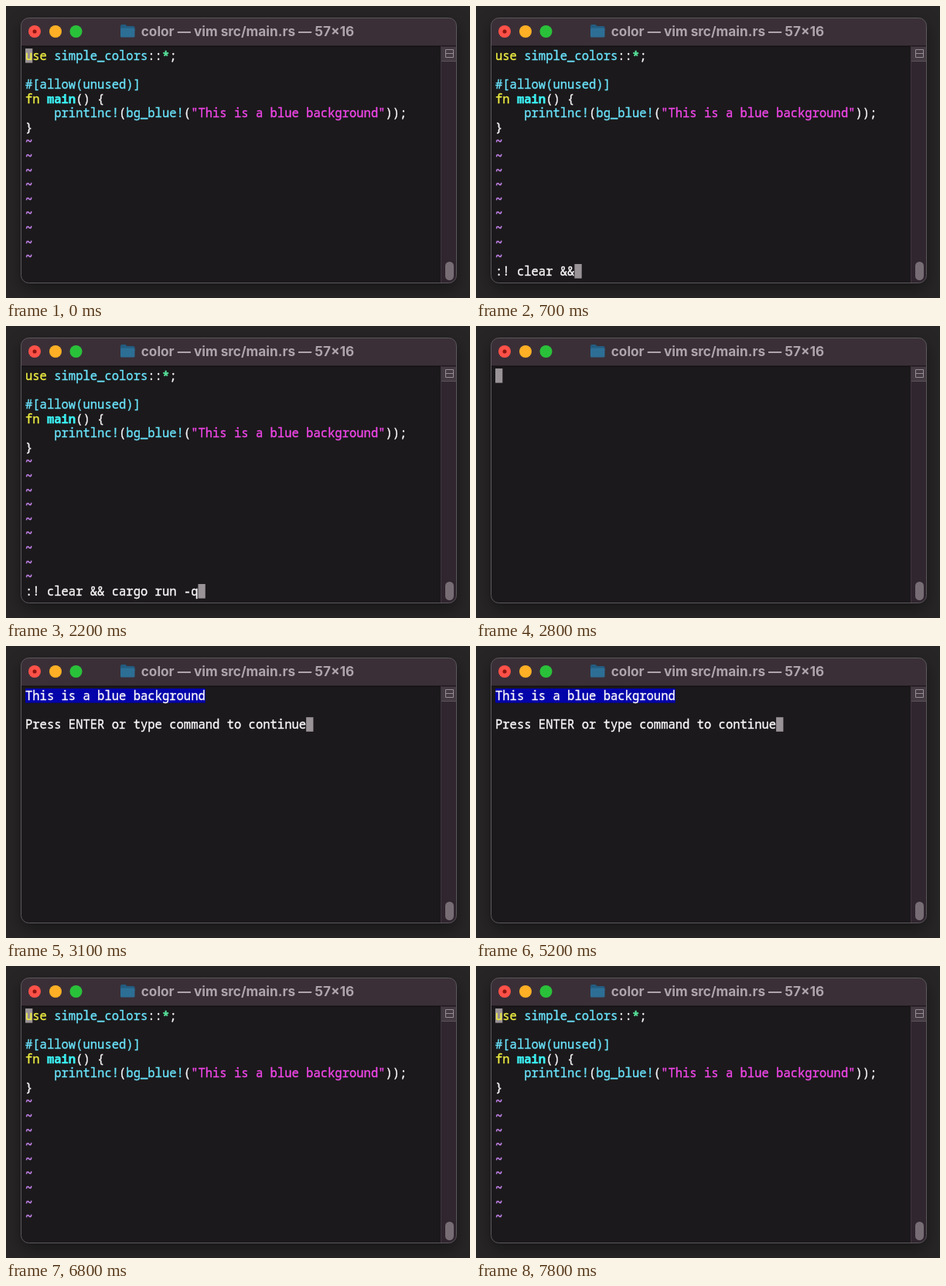
Recreate the animation shown at these times as an HTML page. Size 600x378 px, loop 8 s.

```html
<!DOCTYPE html>
<html lang="en">
<head>
<meta charset="utf-8">
<style>
  html, body { margin: 0; width: 100%; height: 100%; overflow: hidden; background: #252324; }
  svg { display: block; width: 600px; height: 378px; }
  .term text { font: 500 15.5px "Noto Sans Mono", "DejaVu Sans Mono", monospace; white-space: pre; stroke-width: .35px; }
  .term .bold { font-weight: 700; }
  .title { font: 700 17.2px Inter, Roboto, sans-serif; fill: #aea4ab; text-anchor: middle; }
</style>
</head>
<body>
<svg viewBox="0 0 600 378">
  <defs>
    <clipPath id="frame"><rect x="19.5" y="15.5" width="563" height="343" rx="10"/></clipPath>
    <filter id="shadow" x="-10%" y="-10%" width="120%" height="125%" color-interpolation-filters="sRGB">
      <feDropShadow dx="0" dy="7" stdDeviation="10" flood-color="#000" flood-opacity=".4"/>
    </filter>
  </defs>
  <rect width="600" height="378" fill="#272526"/>
  <rect x="19.5" y="15.5" width="563" height="343" rx="10" fill="#1b191b" filter="url(#shadow)"/>
  <g clip-path="url(#frame)">
    <rect x="19" y="15" width="564" height="37" fill="#3a2f37"/>
    <rect x="19" y="51.5" width="564" height="1" fill="#0c0a0c"/>
    <rect x="562" y="52" width="21" height="307" fill="#30262f"/>
    <rect x="562" y="52" width="1" height="307" fill="#40363f"/>
    <rect x="563" y="53" width="19" height="18" fill="#433a42"/>
    <path d="M563 71.5h19" stroke="#5c525a"/>
    <path d="M568.5 56.5h10v10h-10zM568.5 61.5h10" fill="none" stroke="#968e94"/>
    <rect x="568" y="331" width="11" height="24" rx="5.5" fill="#776e75"/>
  </g>
  <rect x="19.5" y="15.5" width="563" height="343" rx="10" fill="none" stroke="#5c575b"/>
  <circle cx="37" cy="33" r="8" fill="#fc5148"/>
  <circle cx="37" cy="33" r="2.5" fill="#8a1610"/>
  <circle cx="64" cy="33" r="8" fill="#fdb025"/>
  <circle cx="90.5" cy="33" r="8" fill="#2ac13a"/>
  <path d="M148 26q0-2 2-2h4.500l2 2h8q2 0 2 2v4h-18.500z" fill="#225c80"/>
  <rect x="148" y="28.5" width="18.5" height="12" rx="1.5" fill="#2d6e95"/>
  <text class="title" x="312.5" y="39">color — vim src/main.rs — 57×16</text>
  <g id="screen" class="term"></g>
</svg>
<script>
const LOOP = 8000, LEFT = 25, TOP = 55, CELL = 9.31, ROW = 18.6;
const YELLOW = '#eeee42', CYAN = '#69e2fa', AQUA = '#3cf2f4', GREEN = '#58e09a',
      PINK = '#f046e8', VIOLET = '#c283ea', WHITE = '#faf7f9', GRAY = '#999296';
const COMMAND = ':! clear && cargo run -q';
const screen = document.getElementById('screen');

// Draws one row from [text, colour, class] runs, one x position per cell
function line(row, ...runs) {
  let col = 0, out = '';
  for (const [text, color, style = ''] of runs) {
    const xs = [...text].map((_, i) => (LEFT + (col + i) * CELL).toFixed(2)).join(' ');
    const safe = text.replace(/&/g, '&amp;');
    out += `<text class="${style}" x="${xs}" y="${TOP + 14.7 + row * ROW}" fill="${color}" stroke="${color}">${safe}</text>`;
    col += text.length;
  }
  return out;
}

const block = (row, col, cells, fill) =>
  `<rect x="${LEFT + col * CELL}" y="${TOP + row * ROW}" width="${cells * CELL}" height="${ROW}" fill="${fill}"/>`;
const cursor = (row, col) => block(row, col, 1, GRAY);

const code =
  line(0, ['use ', YELLOW], ['simple_colors', CYAN], ['::', WHITE], ['*', GREEN, 'bold'], [';', WHITE]) +
  line(2, ['#[allow(unused)]', CYAN]) +
  line(3, ['fn ', YELLOW], ['main', AQUA, 'bold'], ['() {', WHITE]) +
  line(4, ['    printlnc!', CYAN], ['(', WHITE], ['bg_blue!', CYAN], ['(', WHITE],
          ['"This is a blue background"', PINK], ['));', WHITE]) +
  line(5, ['}', WHITE]) +
  Array.from({ length: 9 }, (_, i) => line(6 + i, ['~', VIOLET, 'bold'])).join('');

const message = 'This is a blue background';
const prompt = 'Press ENTER or type command to continue';
const output = block(0, 0, message.length, '#0303aa') + line(0, [message, WHITE]) +
  line(2, [prompt, WHITE]) + cursor(2, prompt.length);

// Characters of the command typed so far
function typed(t) {
  if (t >= 2100) return 24;
  if (t >= 1800) return 23;
  if (t >= 1500) return 22;
  const step = Math.min(8, Math.floor((t - 300) / 100));
  return Math.round(1 + step * 2.5);
}

function view(t) {
  if (t < 300 || t >= 6700) return cursor(0, 0) + code;
  if (t >= 3100) return output;
  if (t >= 2800) return cursor(0, 0);
  const n = typed(t);
  return code + line(15, [COMMAND.slice(0, n), WHITE]) + cursor(15, n);
}

let shown;
function draw() {
  const next = view(performance.now() % LOOP);
  if (next !== shown) screen.innerHTML = shown = next;
  requestAnimationFrame(draw);
}
draw();
</script>
</body>
</html>
```
